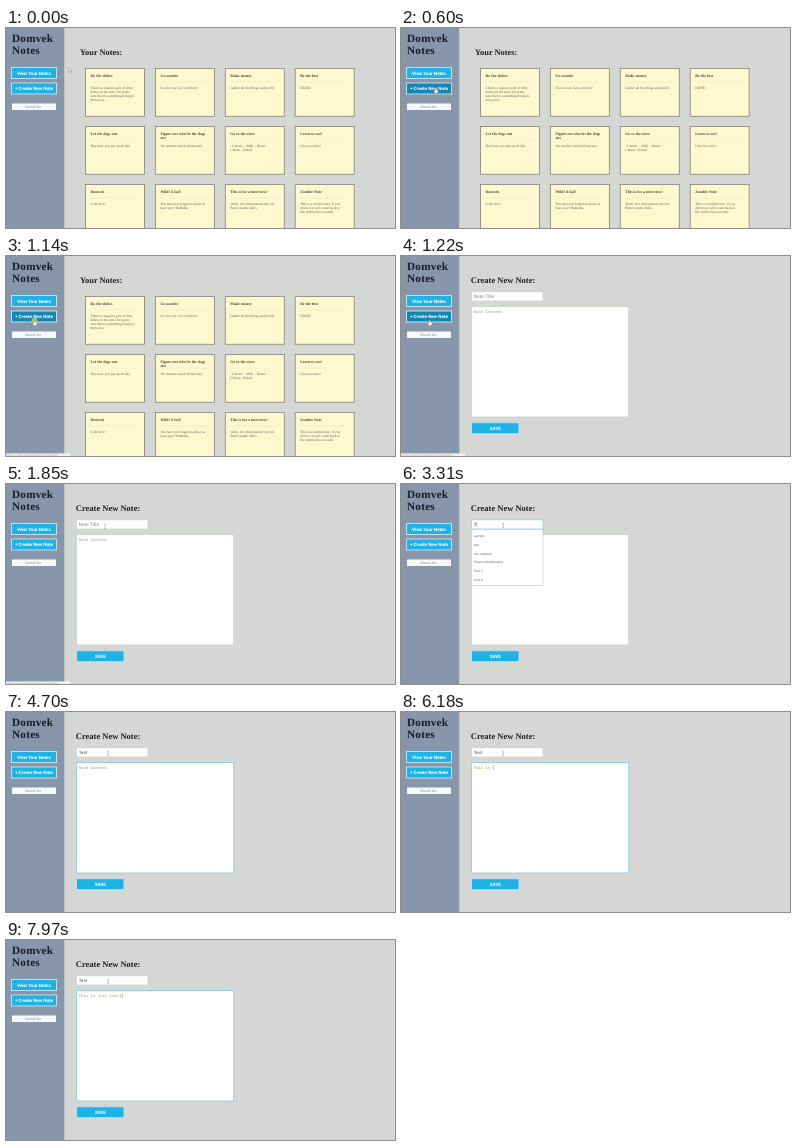
An HTML page for the animation above (8 s loop, 389 px wide and 200 px high).

```html
<!DOCTYPE html>
<html lang="en">
<head>
<meta charset="utf-8">
<title>Notes app</title>
<style>
  html, body { margin: 0; width: 100%; height: 100%; overflow: hidden; background: #d5d7d5; }
  svg { display: block; width: 389px; height: 200px; }
  text { text-rendering: geometricPrecision; white-space: pre; }
  .serif { font-family: "Liberation Serif", serif; }
  .sans { font-family: Roboto, sans-serif; }
  .mono { font-family: "Liberation Mono", monospace; }
  .bold { font-weight: 700; }
</style>
</head>
<body>
<svg id="stage" viewBox="0 0 389 200"></svg>
<script>
const LOOP = 8000, CLICK = 1140, PAGE = 1220, FOCUS_TITLE = 2300, FOCUS_BODY = 4170;
const BLUE = '#1eb2e5', HOVER_BLUE = '#1386b5', FOCUS = '#8fcfe6', FIELD = '#ccd5c9';
const stage = document.getElementById('stage');

function add(parent, tag, attrs, content) {
  const node = document.createElementNS('http://www.w3.org/2000/svg', tag);
  for (const key in attrs) node.setAttribute(key, attrs[key]);
  if (content) node.textContent = content;
  return parent.appendChild(node);
}
const group = parent => add(parent, 'g', {});
const box = (parent, x, y, width, height, fill, stroke = 'none', lineWidth = 1) =>
  add(parent, 'rect', { x, y, width, height, fill, stroke, 'stroke-width': lineWidth });
const label = (parent, x, y, size, style, fill, content, extra) =>
  add(parent, 'text', { x, y, 'font-size': size, class: style, fill, ...extra }, content);
const line = (parent, d, stroke, width, extra) =>
  add(parent, 'path', { d, stroke, 'stroke-width': width, fill: 'none', ...extra });
const show = (node, on) => node.setAttribute('display', on ? 'inline' : 'none');
const middle = { 'text-anchor': 'middle' };

function button(parent, x, y, width, content) {
  const face = box(parent, x, y, width, 11, BLUE, '#c6dde7');
  label(parent, x + width / 2, y + 7.2, 4.55, 'sans bold', '#fff', content, middle);
  return { face, x, y, width };
}

// Sidebar
box(stage, 0, 0, 58.3, 200, '#8796aa');
['Domvek', 'Notes'].forEach((word, i) =>
  label(stage, 6, 14.3 + i * 11.5, 11.2, 'serif bold', '#151b25', word, { 'letter-spacing': .25 }));
const navButtons = [
  button(stage, 5.5, 39.5, 45, 'View Your Notes'),
  button(stage, 5.5, 55, 45, '+ Create New Note')
];
box(stage, 6, 75.5, 44, 6.5, '#f8f9fa');
label(stage, 27, 80.1, 3.6, 'sans', '#8d8d8d', 'Search for', middle);

// Page with the list of notes
const cards = [
  ['Do the dishes', "There's a massive pile of dirty|dishes in the sink. I'm pretty|sure there's something living in|there now."],
  ['Go outside', "It's nice out. Get out there!"],
  ['Make money', 'Gather all the things and profit!'],
  ['Be the best', 'DONE!'],
  ['Let the dogs out', 'Hey have you put up all day.'],
  ['Figure out who let the dogs|out', 'Yet another unsolved mystery.'],
  ['Go to the store', '- Carrots  - Milk  - Butter  -|Cheese - Bread'],
  ['Learn to use!', "I'm a test note!"],
  ['Domvek', 'is the best!'],
  ['Wild! A fad!', 'You have not forgotten about us|have you? Hahhaha.'],
  ['This is for a interview!', "Work, let's demonstrate my job.|Better studio skills."],
  ['Zombie Note', 'This is a zombie note. If you|delete it it will come back to|life within five seconds.']
];
const listPage = group(stage);
label(listPage, 74, 26.7, 8.35, 'serif bold', '#1c1c1c', 'Your Notes:');
cards.forEach(([title, body], i) => {
  const x = 79.5 + i % 4 * 69.9, y = 40.5 + Math.floor(i / 4) * 58;
  box(listPage, x, y, 59, 47.8, '#fdf8ce', '#8f8e80', .9);
  title.split('|').forEach((row, n) =>
    label(listPage, x + 5, y + 8.8 + n * 4, 3.9, 'serif bold', '#45443a', row));
  line(listPage, `M${x + 5} ${y + 13.5}h49.5`, '#d8d4b2', .4, { 'stroke-dasharray': '1 .6' });
  body.split('|').forEach((row, n) =>
    label(listPage, x + 5, y + 20.8 + n * 4, 3.5, 'serif', '#5f5e52', row));
});

// Page with the form
const formPage = group(stage);
label(formPage, 69.8, 26.7, 8.5, 'serif bold', '#1c1c1c', 'Create New Note:');
const titleBox = box(formPage, 70.5, 35.8, 71.5, 9.2, '#fff', FIELD, .8);
const titleHint = label(formPage, 72.7, 42.3, 4.7, 'sans', '#858585', 'Note Title');
const titleText = label(formPage, 72.7, 42.1, 4.4, 'sans', '#454545');
const bodyBox = box(formPage, 70.5, 50.5, 157.2, 110.5, '#fff', FIELD, .9);
const bodyHint = label(formPage, 72.6, 57, 4, 'mono', '#939393', 'Note Content');
const bodyText = label(formPage, 72.6, 57, 4, 'mono', '#9b974d');
button(formPage, 70.5, 166.7, 47.5, 'SAVE');

const dropdown = group(formPage);
box(dropdown, 70.3, 45.3, 71.7, 56, '#fff', '#b9bdbd', .5);
['sample', 'test', 'test updated', 'Finance/dashboards', 'Test 3', 'Test 4'].forEach((row, i) =>
  label(dropdown, 72.8, 53.2 + i * 8.7, 3.2, 'sans', '#5c6668', row));
const caret = box(formPage, 0, 0, .5, 4.6, '#777');

// Browser status bar
const status = group(stage);
box(status, 0, 197.4, 64, 3, '#f1f2f3');
label(status, 1, 200.4, 2.8, 'sans', '#a5a5a5', 'https://notes.example/notes/create/new');

// Pointers, each with its hot spot at 0,0
const clickGlow = add(stage, 'circle', { r: 3, fill: '#d9dc3c', opacity: .75 });
const pointers = {
  arrow: add(stage, 'path', { d: 'M0 0v4.6l1.1-1 .8 1.7.8-.4-.8-1.6h1.5z', fill: '#fff', stroke: '#666', 'stroke-width': .4 }),
  hand: add(stage, 'path', { d: 'M-.6 0h1.1v2l2 .5v2l-.7 1.4h-2.7l-1.3-2.4.6-.5 1 .8z', fill: '#fff', stroke: '#555', 'stroke-width': .4 }),
  beam: line(stage, 'M-.8-2.2H.8M0-2.2V2.2M-.8 2.2H.8', '#888', .5)
};

const titleKeys = [3310, 3540, 3770, 3920];
const bodyKeys = [5160, 5390, 5560, 5640, 5720, 5880, 6030, 6180, 6810,
                  6960, 7040, 7190, 7270, 7420, 7550, 7740, 7890, 7970];
const typed = (content, keys, t) => content.slice(0, keys.filter(key => key <= t).length);
const progress = (t, from, to) => Math.min(1, Math.max(0, (t - from) / (to - from)));

function pointerAt(t) {
  const there = progress(t, 170, 760), back = 1 - progress(t, 1350, 1980);
  const a = there * there * (3 - 2 * there), b = 1 - back * back;
  return t < 1350
    ? [62.5 - 34 * a, 39.5 + 24.3 * a]
    : [28.5 + 73.7 * b, 63.8 - 22.3 * b];
}

function drawPointer(t) {
  const [x, y] = pointerAt(t);
  const over = navButtons.find(b => x > b.x && x < b.x + b.width && y > b.y && y < b.y + 11);
  navButtons.forEach(b => b.face.setAttribute('fill', b === over ? HOVER_BLUE : BLUE));
  const kind = over ? 'hand' : t >= PAGE && x > 70 && y < 45 ? 'beam' : 'arrow';
  for (const name in pointers) show(pointers[name], name === kind);
  pointers[kind].setAttribute('transform', `translate(${x} ${y})`);
  clickGlow.setAttribute('transform', `translate(${x} ${y + 1})`);
  show(clickGlow, t >= CLICK && t < PAGE);
}

function drawForm(t) {
  const title = typed('Test', titleKeys, t), body = typed('This is just testi', bodyKeys, t);
  const inTitle = t >= FOCUS_TITLE && t < FOCUS_BODY, inBody = t >= FOCUS_BODY;
  titleText.textContent = title;
  bodyText.textContent = body;
  show(titleHint, !title);
  show(bodyHint, !body);
  show(dropdown, inTitle);
  titleBox.setAttribute('stroke', inTitle ? FOCUS : FIELD);
  bodyBox.setAttribute('stroke', inBody ? FOCUS : FIELD);

  const blinkedOff = t >= 2760 && t < 3310 || t >= 4700 && t < 5160;
  show(caret, (inTitle || inBody) && !blinkedOff);
  const width = inBody ? body.length * 2.4 : title ? titleText.getComputedTextLength() : 0;
  caret.setAttribute('x', 72.7 + width);
  caret.setAttribute('y', inBody ? 53.3 : 38.2);
}

function draw(now) {
  const t = now % LOOP;
  show(listPage, t < PAGE);
  show(formPage, t >= PAGE);
  show(status, t >= 910 && t < 1980);
  status.setAttribute('opacity', t < 990 ? .5 : 1);
  drawPointer(t);
  if (t >= PAGE) drawForm(t);
}

const start = performance.now();
function tick() {
  draw(performance.now() - start);
  requestAnimationFrame(tick);
}
tick();
</script>
</body>
</html>
```
